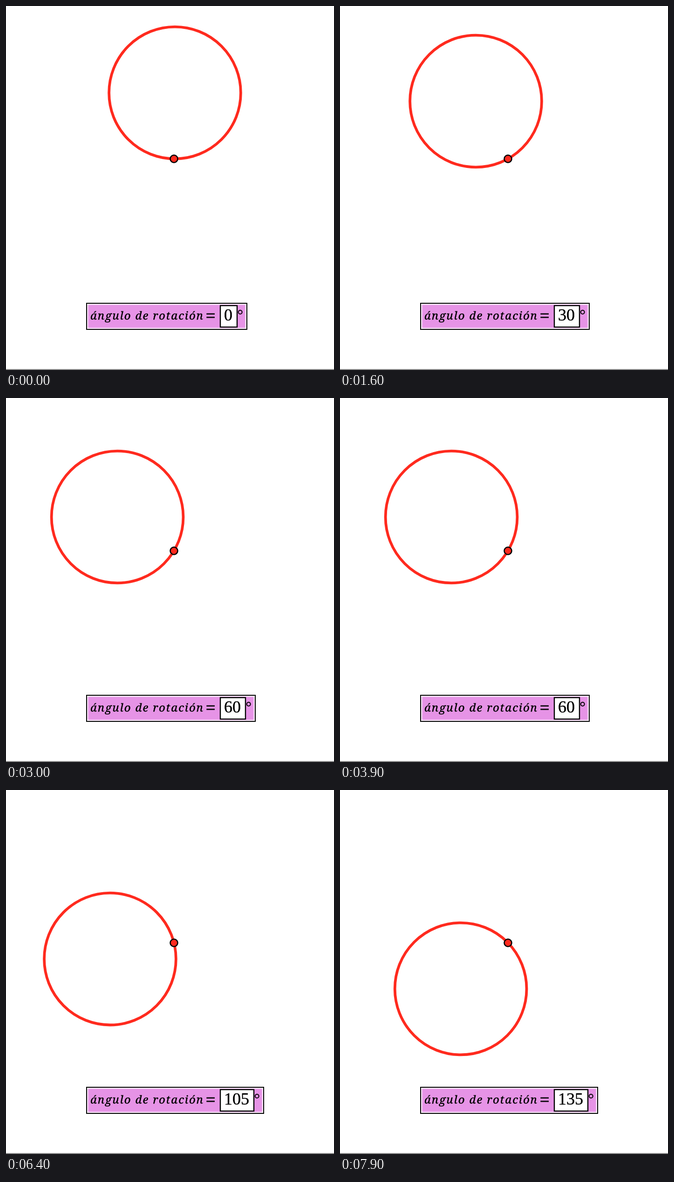
Recreate the animation shown at these times as an HTML page. Size 704x780 px, loop 8000 ms.

```html
<!DOCTYPE html>
<html lang="es">
<head>
<meta charset="utf-8">
<title>Ángulo de rotación</title>
<style>
html, body { margin: 0; width: 100%; height: 100%; overflow: hidden; background: #fff; }
svg { display: block; }
text { stroke: #000; stroke-width: .4; }
.label { font: italic 24px "Noto Serif", serif; letter-spacing: 1.9px; }
.math { font: 36px "Liberation Serif", "Times New Roman", serif; }
.equals { stroke-width: .8; }
.line { fill: none; stroke: #000; stroke-width: 2; }
</style>
</head>
<body>
<svg width="704" height="780" viewBox="0 0 704 780">
  <defs>
    <filter id="soft" x="-5%" y="-10%" width="110%" height="120%">
      <feGaussianBlur stdDeviation=".9"/>
    </filter>
  </defs>
  <circle id="ring" r="141.4" fill="none" stroke="#ff2a1e" stroke-width="5.8"/>
  <circle cx="360.5" cy="327.5" r="8" fill="#ff2a1e" stroke="#000" stroke-width="2.6"/>

  <rect id="frame" class="line" x="173" y="637" height="56"/>
  <rect id="panel" x="176" y="640" height="50" fill="#e693e6" filter="url(#soft)"/>
  <text class="label" x="181" y="672">ángulo de rotación</text>
  <text class="math equals" x="429" y="676">=</text>
  <rect id="box" x="460" y="642" height="46" fill="#fff" stroke="#000" stroke-width="2.4"/>
  <text id="value" class="math" x="468" y="674"></text>
  <circle id="degree" class="line" cy="656" r="4"/>
  <rect y="778" width="704" height="2" fill="#868686"/>
</svg>
<script>
const LOOP = 8000, FIRST = 210, HOLD = 930, STEP = 15;
const PIVOT = { x: 360.5, y: 327.4 }, RADIUS = 141.4, TILT = 0.8;
const DIGIT = 18;

const set = (id, attrs) => {
  const el = document.getElementById(id);
  for (const name in attrs) el.setAttribute(name, attrs[name]);
};

function draw(t) {
  // The angle jumps by one step, then holds.
  const angle = STEP * Math.floor((t - FIRST) / HOLD + 1);
  const a = (angle - TILT) * Math.PI / 180;
  set("ring", {
    cx: PIVOT.x - RADIUS * Math.sin(a),
    cy: PIVOT.y - RADIUS * Math.cos(a)
  });

  // The label widens with each extra digit.
  const text = String(angle);
  const extra = DIGIT * (text.length - 1);
  set("frame", { width: 344 + extra });
  set("panel", { width: 338 + extra });
  set("box", { width: 36 + extra });
  set("degree", { cx: 502.7 + extra });
  document.getElementById("value").textContent = text;
}

const start = performance.now();
function tick() {
  draw((performance.now() - start) % LOOP);
  requestAnimationFrame(tick);
}
tick();
</script>
</body>
</html>
```
